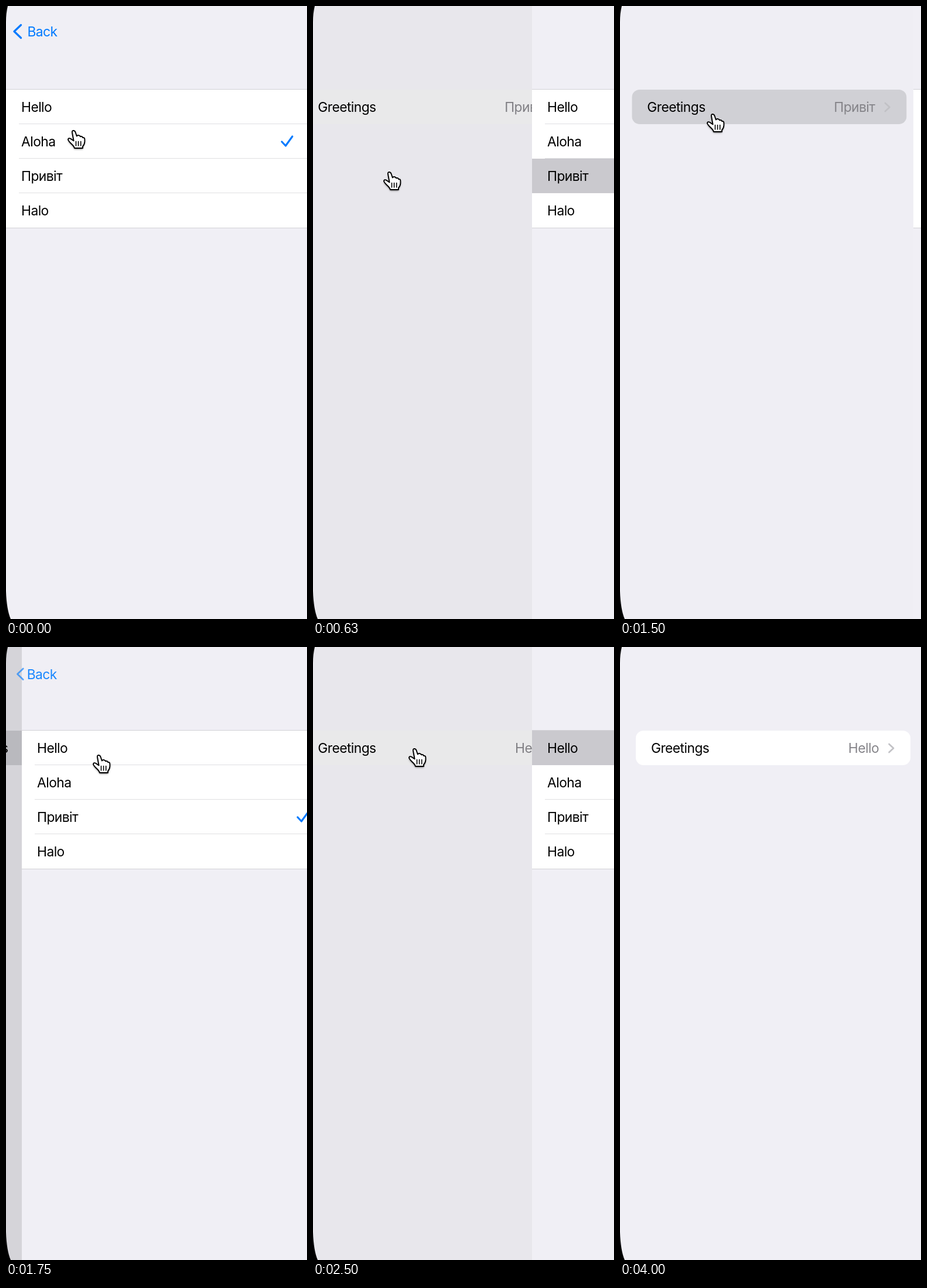
Animation of 514 by 1048 pixels, one loop 4.37 s. Source, as an HTML page with a canvas:

```html
<!DOCTYPE html>
<html lang="en">
<head>
<meta charset="utf-8">
<title>Greeting picker</title>
<style>
  html, body { margin: 0; width: 100%; height: 100%; overflow: hidden; background: #f0eff5; }
  canvas { display: block; }
</style>
</head>
<body>
<canvas id="stage" width="514" height="1048"></canvas>
<script>
const ctx = document.getElementById('stage').getContext('2d');
const LOOP = 4370, TICK = 125, W = 514, H = 1048;
const PAGE = 523, ROW = 59, TOP = 143;
const BG = '#f0eff5', BLUE = '#007aff';
const GREETINGS = ['Hello', 'Aloha', 'Привіт', 'Halo'];

// Ticks at which a tap ring is shown.
const TAPS = [3, 11, 18];
// Each tap starts a page transition just before the following tick (seconds).
const [POP_1, PUSH, POP_2] = TAPS.map(tick => (tick + 1) * TICK / 1000 - 0.0185);
// Pointer path: tick, left, top.
const POINTER = [
  [0, 105, 212], [1, 107, 225], [2, 117, 270], [3, 120, 283], [7, 120, 283],
  [8, 135, 230], [9, 148, 184], [15, 148, 184], [16, 150, 182], [17, 160, 175],
  [18, 163, 173], [22, 163, 173], [23, 166, 186], [24, 183, 255], [25, 183, 255], [26, 176, 141]
];
const POINTER_END = 27;

const hand = new Path2D('M8 4Q7.6 1 10.2 1Q12.6 1 13.6 4L15.8 10.5Q17 8.6 19.5 9.2Q21.6 9.6 22 11.4' +
  'Q25 10.2 26 13Q29.4 12.6 29.4 16V20Q29 25 26 28V31H12Q11 27.5 6 23Q1 18 1 16Q2 13.2 5 14.6L10.6 18.5Z');
const handLines = new Path2D('M14.5 19.5V27M18.6 19.5V27M22.7 19.5V27');
const corners = new Path2D('M0 0H3Q0 12 0 28ZM0 1000Q1 1032 8 1048H0Z');

// Critically damped progress from 0 to 1.
const spring = t => t <= 0 ? 0 : 1 - (1 + 17.5 * t) * Math.exp(-17.5 * t);

function rect(x, y, w, h, color) {
  ctx.fillStyle = color;
  ctx.fillRect(x, y, w, h);
}

function text(string, x, y, color, align = 'left') {
  ctx.font = '22.8px Inter, sans-serif';
  ctx.letterSpacing = '-0.55px';
  ctx.textAlign = align;
  ctx.fillStyle = color;
  ctx.fillText(string, x, y);
}

function line(points, color, width) {
  ctx.beginPath();
  points.forEach(([x, y]) => ctx.lineTo(x, y));
  ctx.strokeStyle = color;
  ctx.lineWidth = width;
  ctx.stroke();
}

// Runs draw() shifted by (x, y) with its own opacity and scale.
function layer(x, y, draw, alpha = 1, scale = 1) {
  ctx.save();
  ctx.translate(x, y);
  ctx.scale(scale, scale);
  ctx.globalAlpha = Math.max(0, alpha);
  draw();
  ctx.restore();
}

function rootPage(value, pressed) {
  ctx.beginPath();
  ctx.roundRect(27, TOP, 469, ROW, 13);
  ctx.fillStyle = '#fff';
  ctx.fill();
  ctx.fillStyle = `rgba(209,209,214,${pressed})`;
  ctx.fill();
  text('Greetings', 53, 181, '#000');
  text(value, 442, 181, '#858489', 'right');
  line([[459.5, 166], [467, 173], [459.5, 180]], '#c2c2c6', 2.7);
}

function listPage(checked, pressed) {
  rect(0, 0, PAGE, H, BG);
  rect(0, TOP - 1, PAGE, 4 * ROW + 2, '#d2d1d6');
  rect(0, TOP, PAGE, 4 * ROW, '#fff');
  for (let i = 1; i < 4; i++) rect(22, TOP + i * ROW - 1, PAGE, 1, '#dfdfe2');
  if (pressed >= 0) rect(0, TOP + pressed * ROW, PAGE, ROW, '#cac9ce');
  GREETINGS.forEach((greeting, i) => {
    const y = TOP + i * ROW;
    text(greeting, 26, y + 38, '#000');
    if (i === checked) line([[471, y + 30], [477.5, y + 37], [489, y + 21]], BLUE, 3.1);
  });
}

function backButton(p) {
  layer(19.5 + 90 * p, 43.5 + 55 * p,
    () => line([[6, -11], [-5.5, 0], [6, 11]], BLUE, 3.3), 1 - 7 * p, Math.max(0.5, 1 - 3 * p));
  layer(36.5 - 15 * p, 52 + 50 * p, () => text('Back', 0, 0, BLUE), 1 - 2 * p);
}

function pointerAt(tick) {
  const i = POINTER.findIndex(key => key[0] >= tick);
  const b = POINTER[i], a = POINTER[Math.max(0, i - 1)];
  const k = b === a ? 0 : (tick - a[0]) / (b[0] - a[0]);
  return [a[1] + (b[1] - a[1]) * k, a[2] + (b[2] - a[2]) * k];
}

function drawPointer() {
  ctx.save();
  ctx.shadowColor = 'rgba(0,0,0,.5)';
  ctx.shadowBlur = 3;
  ctx.shadowOffsetY = 2;
  ctx.fillStyle = '#fff';
  ctx.fill(hand);
  ctx.restore();
  ctx.strokeStyle = '#000';
  ctx.lineWidth = 1.9;
  ctx.stroke(hand);
  ctx.lineWidth = 1.6;
  ctx.stroke(handLines);
}

function draw(tick) {
  const t = tick * TICK / 1000;
  const second = t >= POP_2;
  let p = t < PUSH ? spring(t - POP_1) : second ? spring(t - POP_2) : 1 - spring(t - PUSH);
  if (p < 0.004) p = 0;
  if (p > 0.996) p = 1;
  const pushing = t >= PUSH && !second;
  const pressedRow = second ? 0 : t >= POP_1 && !pushing ? 2 : -1;
  const checked = second ? 0 : t < POP_1 ? 1 : 2;

  ctx.lineCap = ctx.lineJoin = 'round';
  rect(0, 0, W, H, BG);
  layer(-0.3 * PAGE * (1 - p), 0, () => rootPage(GREETINGS[second ? 0 : 2], pushing ? 1 : 1 - p));
  rect(0, 0, W, H, `rgba(0,0,0,${0.12 * (1 - p)})`);
  layer(Math.round(p * PAGE), 0, () => listPage(checked, pressedRow));
  backButton(p);
  ctx.fillStyle = '#000';
  ctx.fill(corners);

  if (tick >= POINTER_END) return;
  const [x, y] = pointerAt(tick);
  if (TAPS.includes(tick)) {
    ctx.beginPath();
    ctx.arc(x + 9, y, 61, 0, 2 * Math.PI);
    ctx.strokeStyle = '#000';
    ctx.lineWidth = 2.8;
    ctx.stroke();
  }
  layer(x, y, drawPointer);
}

function frame() {
  draw(Math.floor(performance.now() % LOOP / TICK));
  requestAnimationFrame(frame);
}
frame();
</script>
</body>
</html>
```
